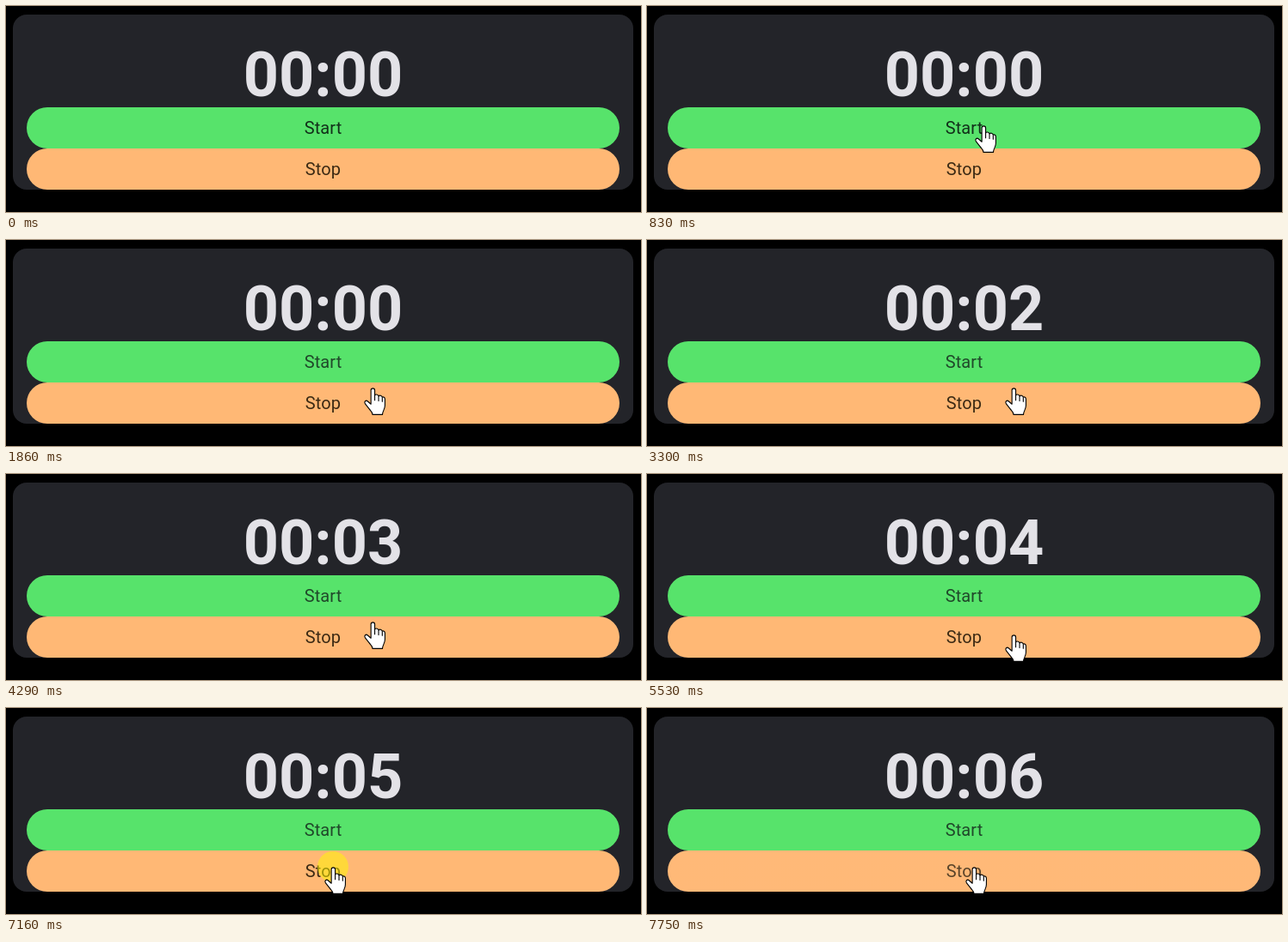
Animation, 738 px wide and 240 px high, one loop 8000 ms. Source, as an HTML page with a canvas:

```html
<!DOCTYPE html>
<html lang="en">
<head>
<meta charset="utf-8">
<title>Stopwatch</title>
<style>
  html, body { margin: 0; overflow: hidden; background: #000; }
  canvas { display: block; }
</style>
</head>
<body>
<canvas id="stage" width="738" height="240"></canvas>
<script>
const ctx = document.getElementById('stage').getContext('2d');
const LOOP = 8000, SAMPLE_MS = 65;
const PRESS_MS = 125, INK_MS = 617;

const buttons = [
  { label: 'Start', y: 118, fill: '#57e36b', text: '#12301a', usedText: '#20482a',
    press: 1040, tap: { x: 392, y: 139 } },
  { label: 'Stop', y: 166, fill: '#ffb875', text: '#3c2a14', usedText: '#5a4429',
    press: 7160, tap: { x: 380, y: 185 } },
];

const entry = { x: 547, y: 222 };
const moves = [
  { start: 240, end: 720, x: 379, y: 139 },
  { start: 700, end: 860, x: 382, y: 139 },
  { start: 1560, end: 1850, x: 416, y: 172 },
  { start: 5110, end: 5290, x: 416, y: 182 },
  { start: 5410, end: 5530, x: 416, y: 187 },
  { start: 5850, end: 6285, x: 370, y: 185 },
];

const hand = new Path2D(
  'M5.5 2C5.5 .1 8.5 .1 8.5 2V6C9 5 11 5.2 11.5 6.7C12.2 5.8 14 6 14.4 7.6' +
  'C15.3 7 16.5 7.6 16.5 9V14C16.5 17 14.8 18 14.5 21.2H6.8C6.6 19 5 18 4.2 16.8' +
  'L1 12.8C-.2 11 1.5 9.5 3 10.8L5.5 13Z');
const knuckles = new Path2D('M8.5 6V10M11.5 7V10.5M14.4 8V11');

const clamp = v => Math.min(1, Math.max(0, v));
const easeInOut = v => v * v * (3 - 2 * v);
const easeOut = v => 1 - (1 - v) ** 2;
const mix = (a, b, k) => a + (b - a) * k;

function pointerAt(t) {
  let { x, y } = entry;
  for (const move of moves) {
    const k = easeOut(clamp((t - move.start) / (move.end - move.start)));
    x = mix(x, move.x, k);
    y = mix(y, move.y, k);
  }
  return [Math.round(x), Math.round(y)];
}

function fillRoundRect(x, y, w, h, r, fill) {
  ctx.fillStyle = fill;
  ctx.beginPath();
  ctx.roundRect(x, y, w, h, r);
  ctx.fill();
}

function disc(x, y, r, fill) {
  ctx.fillStyle = fill;
  ctx.beginPath();
  ctx.arc(x, y, r, 0, 2 * Math.PI);
  ctx.fill();
}

function label(text, y, font, fill, spacing = '0px') {
  ctx.font = font + ' Roboto, sans-serif';
  ctx.letterSpacing = spacing;
  ctx.textAlign = 'center';
  ctx.fillStyle = fill;
  ctx.fillText(text, 368.5, y);
}

// Soft-edged ripple that grows from the tap and drifts to the button's centre
function drawInk({ y, tap, press }, t) {
  const k = (t - press) / INK_MS;
  if (k <= 0 || k >= 1) return;
  const alpha = 0.17 * Math.min(clamp(k / 0.13), clamp((1 - k) / 0.6));
  const drift = clamp(k / 0.5);
  const cx = mix(tap.x, 368.5, drift), cy = mix(tap.y, y + 24, drift);
  const radius = 10 + 440 * easeInOut(clamp(k / 0.65));
  const ink = ctx.createRadialGradient(cx, cy, radius * 0.8, cx, cy, radius);
  ink.addColorStop(0, `rgba(255,255,255,${alpha})`);
  ink.addColorStop(1, 'rgba(255,255,255,0)');
  ctx.save();
  ctx.clip();
  disc(cx, cy, radius, ink);
  ctx.restore();
}

function drawButton(button, t) {
  const { y, fill, text, usedText, press } = button;
  fillRoundRect(24, y, 689, 48, 24, fill);
  drawInk(button, t);
  label(button.label, y + 31, '20px', t > press ? usedText : text, '0.1px');
}

function drawPointer(t) {
  ctx.save();
  ctx.translate(...pointerAt(t));
  ctx.scale(1.48, 1.48);
  ctx.lineWidth = 0.75;
  ctx.lineJoin = ctx.lineCap = 'round';
  ctx.fillStyle = '#fff';
  ctx.strokeStyle = '#000';
  ctx.fill(hand);
  ctx.stroke(hand);
  ctx.stroke(knuckles);
  ctx.restore();
}

function draw(t) {
  const sampled = t - t % SAMPLE_MS;
  ctx.fillStyle = '#000';
  ctx.fillRect(0, 0, 738, 240);
  fillRoundRect(8, 10, 721, 204, 16, '#232429');

  const seconds = Math.max(0, Math.floor((t - 1290) / 1000));
  label('00:' + String(seconds).padStart(2, '0'), 105, 'bold 72px', '#e3e2e7');
  buttons.forEach(button => drawButton(button, sampled));

  for (const { press, tap } of buttons)
    if (t >= press && t < press + PRESS_MS) disc(tap.x, tap.y, 18, 'rgba(255,250,0,.5)');
  if (t >= 240) drawPointer(sampled);
}

function frame() {
  draw(performance.now() % LOOP);
  requestAnimationFrame(frame);
}
frame();
</script>
</body>
</html>
```
